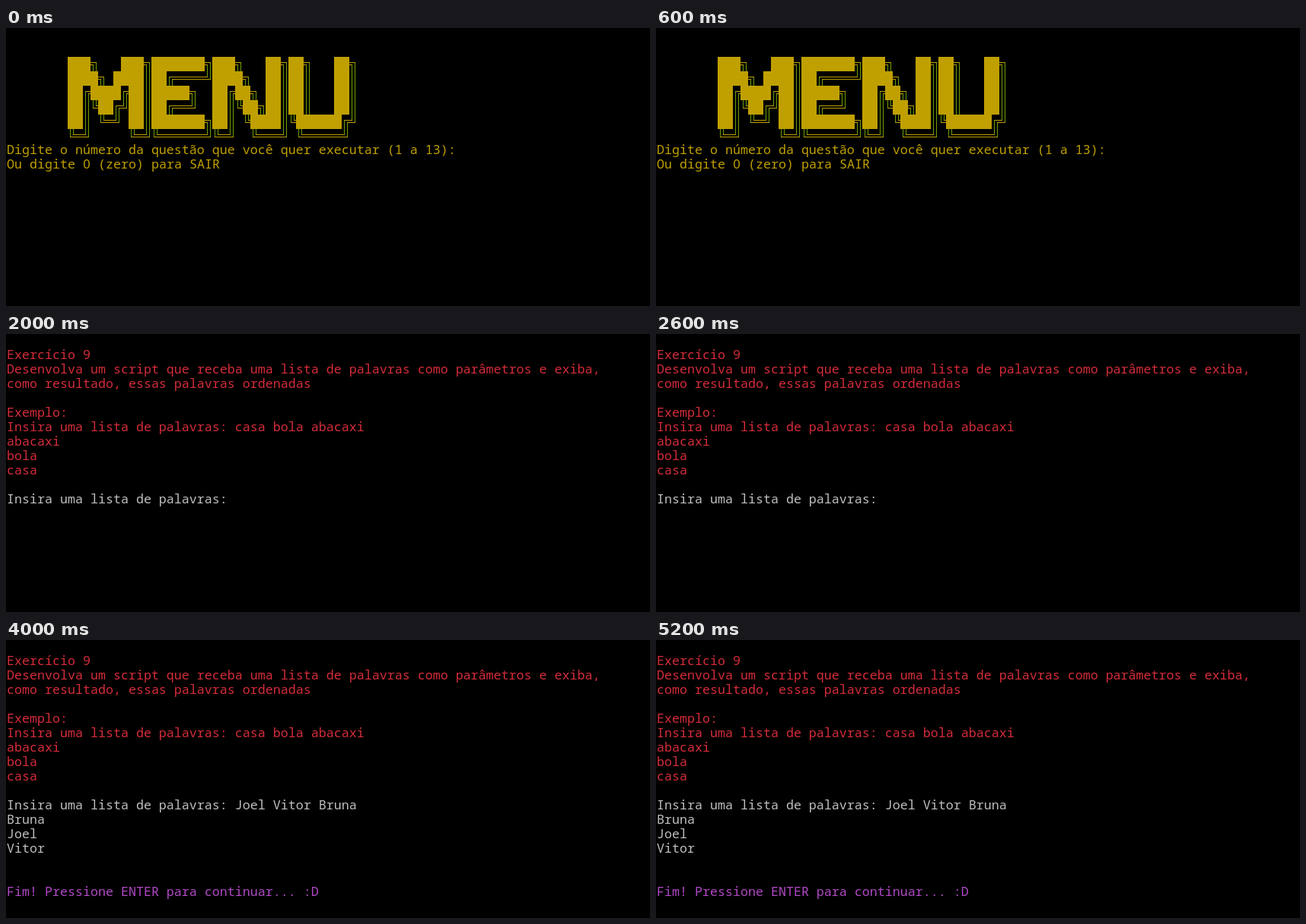
An HTML page that plays this animation: 846x366 px, repeating every 6000 ms.

```html
<!DOCTYPE html>
<html lang="pt">
<head>
<meta charset="utf-8">
<title>Menu de exercícios</title>
<style>
  html, body { margin: 0; width: 100%; height: 100%; overflow: hidden; background: #000; }
  svg { display: block; }
  text { font: 16.667px "Noto Sans Mono", "DejaVu Sans Mono", monospace; white-space: pre; }
  .zero { font-family: "Noto Sans", sans-serif; }
</style>
</head>
<body>
<svg id="term" width="846" height="366" viewBox="0 0 846 366"></svg>
<script>
const LOOP = 6000;
const COL = 10, ROW = 19, LEFT = 1, BASE = 14;
const YELLOW = '#c0a000', LIME = '#70a000', RED = '#d42c3a', WHITE = '#bfbfbf', PURPLE = '#b148c6';
const term = document.getElementById('term');

function add(parent, tag, attrs, content = '') {
  const el = document.createElementNS('http://www.w3.org/2000/svg', tag);
  for (const key in attrs) el.setAttribute(key, attrs[key]);
  el.textContent = content;
  parent.append(el);
  return el;
}

// A group visible from one time up to another
const scenes = [];
function scene(from, to) {
  const el = add(term, 'g', {});
  scenes.push({ el, from, to });
  return el;
}

function print(parent, row, fill, ...lines) {
  lines.forEach((line, i) => {
    if (line) add(parent, 'text', { x: LEFT, y: (row + i) * ROW + BASE, fill }, line);
  });
}

// Block letters with double-line shadows
const BANNER = [
  '███╗   ███╗███████╗███╗   ██╗██╗   ██╗',
  '████╗ ████║██╔════╝████╗  ██║██║   ██║',
  '██╔████╔██║█████╗  ██╔██╗ ██║██║   ██║',
  '██║╚██╔╝██║██╔══╝  ██║╚██╗██║██║   ██║',
  '██║ ╚═╝ ██║███████╗██║ ╚████║╚██████╔╝',
  '╚═╝     ╚═╝╚══════╝╚═╝  ╚═══╝ ╚═════╝'
];
const XS = [3.5, 7.5], YS = [7.5, 10.5];
// Cell edges that each corner reaches
const CORNERS = { '╗': [0, ROW], '╔': [COL, ROW], '╝': [0, 0], '╚': [COL, 0] };

function banner(parent, col, row) {
  let blocks = '', across = '', down = '';
  BANNER.forEach((line, r) => [...line].forEach((ch, c) => {
    const x = LEFT + (col + c) * COL, y = (row + r) * ROW;
    const hLine = (a, b, at) => across += `M${x + a} ${y + at}H${x + b}`;
    const vLine = (a, b, at) => down += `M${x + at} ${y + a}V${y + b}`;
    if (ch === '█') blocks += `M${x} ${y}h${COL}v${ROW}h${-COL}z`;
    else if (ch === '═') YS.forEach(at => hLine(0, COL, at));
    else if (ch === '║') XS.forEach(at => vLine(0, ROW, at));
    else if (CORNERS[ch]) {
      const [edgeX, edgeY] = CORNERS[ch];
      const xs = edgeX ? XS : [...XS].reverse();
      const ys = edgeY ? YS : [...YS].reverse();
      xs.forEach((cx, i) => {
        hLine(edgeX, cx + (edgeX ? -0.5 : 0.5), ys[i]);
        vLine(edgeY, ys[i], cx);
      });
    }
  }));
  add(parent, 'path', { d: down, stroke: LIME });
  add(parent, 'path', { d: across, stroke: YELLOW });
  add(parent, 'path', { d: blocks, fill: YELLOW, 'shape-rendering': 'crispEdges' });
}

const menu = scene(0, 2000);
banner(menu, 8, 2);
print(menu, 8, YELLOW, 'Digite o número da questão que você quer executar (1 a 13):');
const exit = add(menu, 'text', { x: LEFT, y: 9 * ROW + BASE, fill: YELLOW });
add(exit, 'tspan', {}, 'Ou digite ');
add(exit, 'tspan', { x: LEFT + 10 * COL + 0.25, class: 'zero' }, '0');
add(exit, 'tspan', { x: LEFT + 11 * COL }, ' (zero) para SAIR');

const choice = scene(1000, 2000);
print(choice, 10, YELLOW, '9');
add(choice, 'rect', { x: LEFT + COL, y: 10 * ROW, width: 1, height: ROW, fill: WHITE });

const task = scene(2000, LOOP);
print(task, 1, RED,
  'Exercício 9',
  'Desenvolva um script que receba uma lista de palavras como parâmetros e exiba,',
  'como resultado, essas palavras ordenadas',
  '',
  'Exemplo:',
  'Insira uma lista de palavras: casa bola abacaxi',
  'abacaxi',
  'bola',
  'casa');

const words = ['Joel', 'Vitor', 'Bruna'];
const prompt = 'Insira uma lista de palavras: ';
print(scene(2000, 3000), 11, WHITE, prompt);
print(scene(3000, LOOP), 11, WHITE, prompt + words.join(' '));

const result = scene(4000, LOOP);
print(result, 12, WHITE, ...[...words].sort());
print(result, 17, PURPLE, 'Fim! Pressione ENTER para continuar... :D');

function draw() {
  const t = performance.now() % LOOP;
  for (const { el, from, to } of scenes) {
    el.style.display = t >= from && t < to ? '' : 'none';
  }
  requestAnimationFrame(draw);
}
draw();
</script>
</body>
</html>
```
